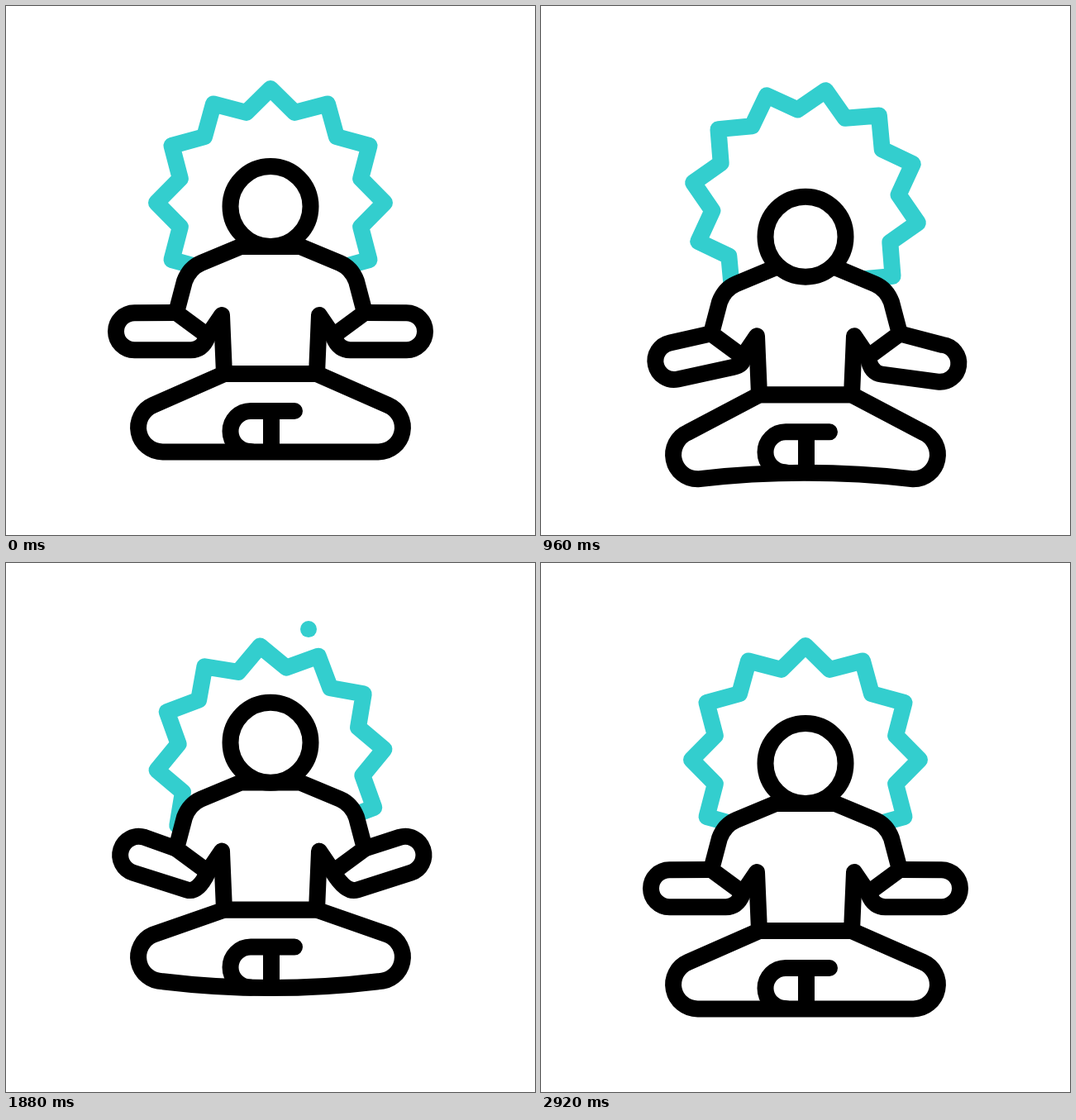
Write an HTML page with a canvas that moves like this. It is 640 by 640 pixels and loops after 3 s.

```html
<!DOCTYPE html>
<html lang="en">
<head>
<meta charset="utf-8">
<title>Meditation</title>
<style>
  html, body { margin: 0; height: 100%; overflow: hidden; background: #fff; }
  canvas { display: block; width: 640px; height: 640px; }
</style>
</head>
<body>
<canvas id="stage" width="640" height="640"></canvas>
<script>
const ctx = document.getElementById('stage').getContext('2d');
const LOOP = 3000, START = 240, TEAL = '#33cece', RAD = Math.PI / 180;

const progress = (t, start, length) => Math.min(1, Math.max(0, (t - start) / length));
const ease = (t, start, length) => (1 - Math.cos(Math.PI * progress(t, start, length))) / 2;
const hump = (t, start, length) => Math.sin(Math.PI * progress(t, start, length));

// Rest, one low swing, one high swing, rest again.
function swing(t, low, high, end, min, max) {
  return min * ease(t, START, low - START)
    + (max - min) * ease(t, low, high - low)
    - max * ease(t, high, end - high);
}
const breath = t => swing(t, 1000, 1850, 2560, 1, -1);

function shape(d, filled) {
  const path = new Path2D(d);
  if (filled) ctx.fill(path);
  ctx.stroke(path);
}

function star(t) {
  const turn = swing(t, 830, 1930, 2920, -21.5, 25);
  ctx.beginPath();
  for (let i = 0; i < 24; i++) {
    const a = (turn + i * 15) * RAD, r = i % 2 ? 113 : 138;
    ctx.lineTo(320 + r * Math.sin(a), 238 - r * Math.cos(a));
  }
  ctx.closePath();
  ctx.stroke();
}

function sparks(t) {
  if (t > 1640) {
    ctx.fillStyle = TEAL;
    ctx.globalAlpha = 1 - ease(t, 1960, 320);
    ctx.beginPath();
    ctx.arc(366, 115 - 53 * ease(t, 1640, 400), 10, 0, 7);
    ctx.fill();
    ctx.globalAlpha = 1;
  }
  if (t > 1940 && t < 2600) {
    const w = 22 * hump(t, 1940, 660), h = w * 1.08;
    shape(`M${104 - w},212.5h${2 * w}M104,${212.5 - h}v${2 * h}`);
  }
}

// Draws the left hand; tilt is in degrees, positive when raised.
function hand(dx, dy, tilt) {
  const a = tilt * RAD, cx = 155.5 + dx, cy = 393.7 + dy;
  const at = (x, y) => [cx + x * Math.cos(a) - y * Math.sin(a), cy + x * Math.sin(a) + y * Math.cos(a)];
  ctx.beginPath();
  ctx.moveTo(206, 371);
  ctx.lineTo(...at(0, -22.5));
  ctx.arc(cx, cy, 22.5, a - Math.PI / 2, a + Math.PI / 2, true);
  ctx.lineTo(...at(68, 22.5));
  ctx.quadraticCurveTo(...at(82, 22.5), 244, 400);
  ctx.stroke();
}

function body(t) {
  const lagged = breath(t - 80), sag = 8 * lagged;
  const nod = 12 * hump(t, START, 1700) ** 2;
  const inward = hump(t, START, 2320);
  const tilt = drop => -lagged * (lagged > 0 ? drop : 18);
  const lift = -0.85 * tilt(13);

  ctx.strokeStyle = '#000';
  ctx.fillStyle = '#fff';
  ctx.save();
  ctx.translate(0, 25.5 * breath(t));

  hand(6.5 * inward, lift, tilt(13));
  ctx.save();
  ctx.translate(640, 0);
  ctx.scale(-1, 1);
  hand(2 * inward, lift + nod / 4, tilt(8));
  ctx.restore();

  // Legs, crossed foot, torso, head
  shape(`M264,445L177.7,${483 + sag}A29.5,29.5 0 0 0 189.5,${539.5 + sag}
    Q320,${539.5 - sag} 450.5,${539.5 + sag}A29.5,29.5 0 0 0 462.3,${483 + sag}L376,445Z`, true);
  shape('M349,490H296A24.5,24.5 0 0 0 296,539M321,490V539');
  shape(`M284,291L236,311Q222,317 216,333L206,371L244,399L261,374L264,445
    H376L379,374L396,399L434,371L424,333Q418,317 404,311L356,291Z`, true);
  ctx.beginPath();
  ctx.arc(320, 242.5 + nod, 48.5, 0, 7);
  ctx.fill();
  ctx.stroke();
  ctx.restore();
}

function draw(t) {
  ctx.fillStyle = '#fff';
  ctx.fillRect(0, 0, 640, 640);
  ctx.lineWidth = 20;
  ctx.lineCap = ctx.lineJoin = 'round';
  ctx.strokeStyle = TEAL;
  star(t);
  sparks(t);
  body(t);
}

const begin = performance.now();
function tick() {
  draw((performance.now() - begin) % LOOP);
  requestAnimationFrame(tick);
}
tick();
</script>
</body>
</html>
```
